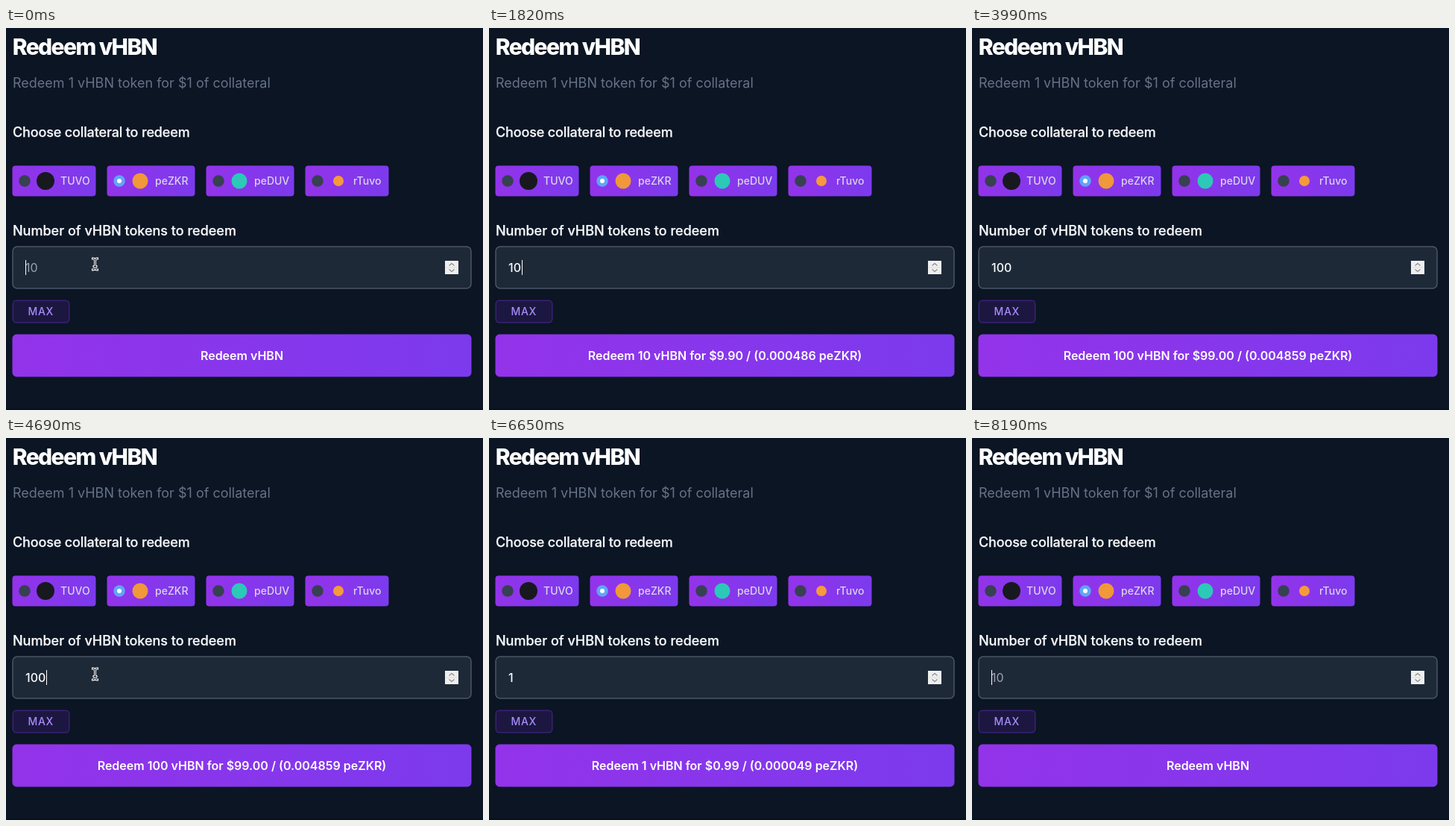
An HTML page that plays this animation: 640x512 px, repeating every 8260 ms.

```html
<!DOCTYPE html>
<html lang="en">
<head>
<meta charset="utf-8">
<title>Redeem vHBN</title>
<style>
  html, body { margin: 0; width: 100%; height: 100%; overflow: hidden; background: #0b1524; }
  svg { display: block; width: 640px; height: 512px; }
  text { font-family: Inter, "Open Sans", sans-serif; font-optical-sizing: none; fill: #f8fafc; white-space: pre; }
  .title { font-size: 30px; font-weight: 800; letter-spacing: -.053em; fill: #fff; }
  .sub { font-size: 18px; fill: #667287; }
  .label { font-size: 18px; font-weight: 500; stroke: #f8fafc; stroke-width: .25; }
  .tight { letter-spacing: -.008em; }
  .purple { fill: url(#purple); stroke: url(#purple); }
  .pill text { font-size: 14px; font-weight: 500; fill: #d9d5e9; }
  .radio { fill: #374151; }
  .radio.on { fill: #60a5fa; }
  .value { font-size: 16px; font-weight: 500; }
  .value.empty { fill: #9ca3af; font-weight: 400; }
  .max { font-size: 14px; font-weight: 500; letter-spacing: .05em; fill: #a78bfa; }
  .action { font-size: 16px; font-weight: 600; text-anchor: middle; fill: #fff; }
  .chevron { fill: none; stroke: #8b8b8b; stroke-width: 1.2; }
  #beam { fill: none; stroke-linecap: square; }
</style>
</head>
<body>
<svg viewBox="0 0 640 512">
  <defs>
    <linearGradient id="purple">
      <stop offset="0" stop-color="#9333ea"/>
      <stop offset="1" stop-color="#7c3aed"/>
    </linearGradient>
    <path id="beam" d="M-3 -7.5 Q0 -7.5 0 -5.5 Q0 -7.5 3 -7.5 M0 -5.5 V5.5 M-3 7.5 Q0 7.5 0 5.5 Q0 7.5 3 7.5 M-1.5 3 H1.5"/>
  </defs>
  <rect width="640" height="512" fill="#0b1524"/>
  <rect y="510" width="640" height="2" fill="#08101b"/>

  <text class="title" x="8.7" y="36">Redeem vHBN</text>
  <text class="sub" x="9" y="80">Redeem 1 vHBN token for $1 of collateral</text>
  <text class="label tight" x="9" y="146">Choose collateral to redeem</text>
  <g id="pills"></g>

  <text class="label" x="9" y="278">Number of vHBN tokens to redeem</text>
  <rect x="9" y="293" width="615" height="56" rx="6" fill="#1e2938" stroke="#4a5666" stroke-width="1.5"/>
  <text class="value" id="value" x="26" y="327"></text>
  <rect id="caret" x="26" y="311" width="1" height="20" fill="#fff"/>
  <rect x="589" y="312" width="18" height="18" fill="#efefef"/>
  <path class="chevron" d="M594.5 318.5 L598 315.5 L601.5 318.5 M594.5 323.5 L598 326.5 L601.5 323.5"/>
  <path d="M590 321 H606" stroke="#dcdcdc"/>

  <rect x="9.25" y="365.25" width="75.5" height="29.5" rx="4.5" fill="#1c1740" stroke="#3b2176" stroke-width="1.5"/>
  <text class="max" x="29.5" y="385">MAX</text>

  <rect class="purple" x="9" y="411" width="615" height="56" rx="5"/>
  <text class="action" id="action" x="316.5" y="445"></text>

  <g id="pointer">
    <use href="#beam" stroke="#fff" stroke-width="3"/>
    <use href="#beam" stroke="#10161f"/>
  </g>
</svg>
<script>
  const LOOP = 8260, BLINK = 500;
  const $ = id => document.getElementById(id);

  // x, width, name, badge colour, badge radius
  const pills = [
    [9, 111, 'TUVO', '#17191f', 12],
    [136, 117, 'peZKR', '#f0983a', 10.5],
    [269, 117, 'peDUV', '#2cc9b8', 10.5],
    [402, 111, 'rTuvo', '#f59a3c', 7]
  ];
  $('pills').innerHTML = pills.map(([x, w, name, color, r], i) => `
    <g class="pill" transform="translate(${x} 185)">
      <rect class="purple" width="${w}" height="40" rx="3"/>
      <circle class="radio ${i === 1 ? 'on' : ''}" cx="16" cy="20" r="7.75"/>
      ${i === 1 ? '<circle cx="16" cy="20" r="3" fill="#fff"/>' : ''}
      <circle cx="44" cy="20" r="${r}" fill="${color}"/>
      <text x="64" y="25">${name}</text>
    </g>`).join('');

  // Each edit restarts the caret blink.
  const edits = [
    [150, ''], [1540, '1'], [1680, '10'], [3350, '100'],
    [5810, '10'], [5950, '1'], [7070, '']
  ];
  const quotes = {
    '': 'Redeem vHBN',
    '1': 'Redeem 1 vHBN for $0.99 / (0.000049 peZKR)',
    '10': 'Redeem 10 vHBN for $9.90 / (0.000486 peZKR)',
    '100': 'Redeem 100 vHBN for $99.00 / (0.004859 peZKR)'
  };

  const ease = p => p * p * (3 - 2 * p);
  const ramp = (t, a, b) => ease(Math.min(1, Math.max(0, (t - a) / (b - a))));
  let shown = null;

  function draw(t) {
    const [since, text] = edits.filter(e => e[0] <= t).pop() || edits[0];
    if (text !== shown) {
      shown = text;
      $('value').textContent = text || '10';
      $('value').classList.toggle('empty', !text);
      $('action').textContent = quotes[text];
      $('caret').setAttribute('x', text ? 27 + Math.round($('value').getComputedTextLength()) : 26);
    }
    const lit = t < since || Math.floor((t - since) / BLINK) % 2 === 0;
    $('caret').style.visibility = lit ? 'visible' : 'hidden';

    const moving = ramp(t, 4690, 5180);
    const visible = t < 1540 || (t >= 4690 && t < 5810);
    $('pointer').style.visibility = visible ? 'visible' : 'hidden';
    $('pointer').setAttribute('transform', `translate(${119.5 + 93 * moving} ${316.5 - moving})`);
  }

  function tick() {
    draw(performance.now() % LOOP);
    requestAnimationFrame(tick);
  }
  tick();
</script>
</body>
</html>
```
